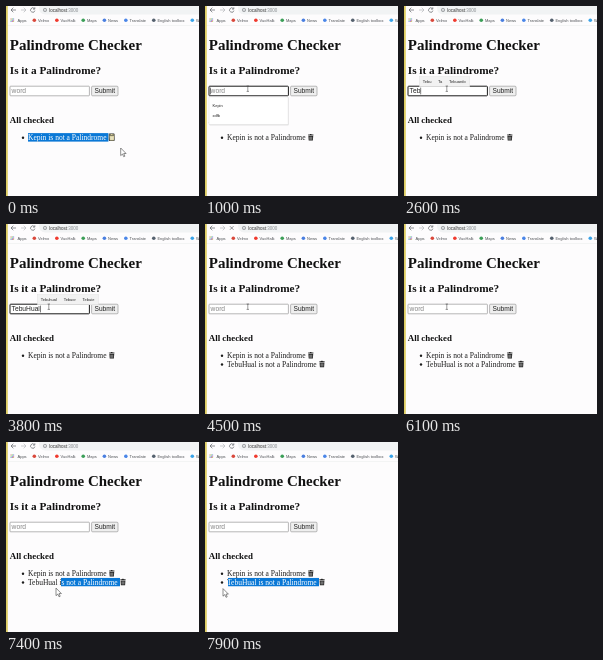
Write an HTML page that moves like this. It is 193x190 px and loops after 8 s.

```html
<!DOCTYPE html>
<html lang="en">
<head>
<meta charset="utf-8">
<title>Palindrome Checker</title>
<style>
  html, body { margin: 0; width: 100%; height: 100%; overflow: hidden; background: #fdfcfd; }
  svg { display: block; width: 100%; height: 100%; }
  text { white-space: pre; }
  .serif { font-family: "Liberation Serif", "Times New Roman", serif; }
  .sans { font-family: "Liberation Sans", Arial, sans-serif; }
  .bold { font-weight: 700; }
</style>
</head>
<body>
<svg viewBox="0 0 193 190">
  <!-- browser bar -->
  <rect x="33" y="-4" width="170" height="12.4" rx="6" fill="#f1f3f4"/>
  <g fill="none" stroke="#5f6368" stroke-width=".7">
    <path d="M10 4H5M7.3 1.7L5 4l2.3 2.3"/>
    <path d="M15 4h5M17.7 1.7L20 4l-2.3 2.3" stroke="#b5b8bb"/>
    <path id="reload" d="M28.4 2.6A2.2 2.2 0 1 0 28.9 4.6M28.8 1.3V3.1H27"/>
    <path id="stop" d="M24.9 2.2l3.6 3.6M28.5 2.2l-3.6 3.6"/>
    <circle cx="39" cy="4" r="1.7" stroke-width=".5"/>
    <path d="M39 3.8v1.1M39 2.9v.4" stroke-width=".5"/>
  </g>
  <text class="sans" x="43.3" y="5.7" font-size="4.5" fill="#333">localhost<tspan fill="#85898d">:3000</tspan></text>
  <g id="marks" class="sans" font-size="4" fill="#4a4d51"></g>
  <rect y="19" width="193" height=".5" fill="#e9eaeb"/>
  <rect width="1.8" height="190" fill="#decd62"/>

  <!-- page -->
  <g class="serif bold" fill="#111">
    <text x="3.8" y="44" font-size="14.95">Palindrome Checker</text>
    <text x="3.8" y="68.4" font-size="11.25">Is it a Palindrome?</text>
    <text x="3.8" y="116.8" font-size="8.9">All checked</text>
  </g>
  <rect id="field" x="4" y="80.2" width="79.4" height="9.6" rx=".7" fill="#fff"/>
  <text id="value" class="sans" x="5.6" y="87.4" font-size="6.7"></text>
  <rect id="caret" y="81.6" width=".5" height="6.8"/>
  <rect x="85.6" y="80.2" width="26.4" height="9.6" rx="1" fill="#efefef" stroke="#8c8c8c" stroke-width=".6"/>
  <text class="sans" x="98.8" y="87.4" font-size="6.6" text-anchor="middle" fill="#222">Submit</text>
  <g id="list" class="serif" font-size="7.52" fill="#1c1c1c"></g>

  <!-- history list -->
  <g id="history" class="sans" font-size="4" fill="#222">
    <rect x="4.2" y="91.4" width="79.6" height="28" rx="1" fill="#000" opacity=".1"/>
    <rect x="4" y="90.8" width="79.2" height="27.8" rx=".8" fill="#fff" stroke="#d5d5d5" stroke-width=".4"/>
    <text x="7.5" y="100.6">Kepin</text>
    <text x="7.5" y="111.4">xdfb</text>
  </g>

  <!-- word hints -->
  <g id="hints" class="sans" font-size="4" fill="#222">
    <rect y="70.6" height="10.2" fill="#f2f2f2" stroke="#dcdcdc" stroke-width=".4"/>
    <text y="77.1"></text>
  </g>

  <path id="arrow" d="M0 0V7.6L1.8 6 3 8.7 4.2 8.2 3 5.5H5.4Z" fill="#fff" stroke="#333" stroke-width=".55"/>
  <path id="beam" d="M-1.2 -2.7H1.2M0 -2.7V2.7M-1.2 2.7H1.2" fill="none" stroke="#444" stroke-width=".55"/>
</svg>

<script>
const LOOP = 8000, STEP = 100;
const $ = id => document.getElementById(id);
const clamp = (v, lo, hi) => Math.min(hi, Math.max(lo, v));
const set = (el, attrs) => { for (const k in attrs) el.setAttribute(k, attrs[k]); };
const show = (el, on) => set(el, { visibility: on ? "visible" : "hidden" });

function make(parent, tag, attrs, text) {
  const el = document.createElementNS("http://www.w3.org/2000/svg", tag);
  set(el, attrs);
  if (text) el.textContent = text;
  parent.append(el);
  return el;
}

// Bookmarks flow from left to right
const marks = {
  Apps: "none", Velmo: "#d9483b", VuoHalk: "#f03a2e", Maps: "#3c9f58",
  News: "#4a7fe0", Translate: "#4a86e8", "English toolbox": "#55616e", Wi: "#3aa3e8"
};
let left = 11.5;
for (const [label, fill] of Object.entries(marks)) {
  const text = make($("marks"), "text", { x: left, y: 15.7 }, label);
  make($("marks"), "circle", { cx: left - 3.7, cy: 14.3, r: 1.8, fill });
  left += text.getComputedTextLength() + 11.4;
}
for (let i = 0; i < 9; i++) {
  const col = i % 3, line = (i - col) / 3;
  make($("marks"), "rect", {
    x: 4.6 + col * 1.3, y: 12.5 + line * 1.3, width: .9, height: .9,
    fill: `hsl(${(col + line) * 110} 60% 55%)`
  });
}

// One result row with a selectable line and a bin button
function row(name, y, binX) {
  const g = make($("list"), "g", {});
  const line = name + " is not a Palindrome";
  const box = { y: y - 6.9, height: 8.7 };
  make(g, "circle", { cx: 17, cy: y - 2.2, r: 1.2 });
  make(g, "text", { x: 22, y }, line);
  const clip = make(make(g, "clipPath", { id: "sel" + y }), "rect", box);
  const marked = make(g, "g", { "clip-path": `url(#sel${y})` });
  make(marked, "rect", { ...box, width: 193, fill: "#0a78d6" });
  make(marked, "text", { x: 22, y, fill: "#fff" }, line);
  const back = make(g, "rect", { x: binX - .4, y: y - 6.4, width: 5.8, height: 7.4, rx: .8, fill: "#25282a" });
  const bin = make(g, "g", { transform: `translate(${binX} ${y - 6})` });
  make(bin, "path", { d: "M0 .6H1.5L2 0H3L3.5 .6H5.2V1.6H0ZM.2 2H5L4.7 6.6H.5Z" });
  make(bin, "path", { d: "M1.6 2.7V5.8M2.6 2.7V5.8M3.6 2.7V5.8", stroke: "#fff", "stroke-width": .4 });
  return {
    g,
    select(from, to, withBin) {
      set(clip, { x: from, width: to - from });
      show(back, withBin);
      set(bin, { fill: withBin ? "#d9cf9c" : "#222" });
    }
  };
}
const first = row("Kepin", 134, 103.2);
const second = row("TebuHual", 142.7, 114.4);

// Typing: one key every 250 ms
const word = "TebuHual", TYPE = 2000, KEY = 250;
const early = ["Tebu", "Ta", "Tebuardo"], late = ["Tebuhual", "Tebuor", "Tebuie"];

// Pointer moves: start, end, x, y
const moves = [
  [0, 900, 42.8, 82.7],
  [6100, 6300, 179, 105],
  [6500, 6800, 155, 157],
  [6800, 7100, 116, 145],
  [7100, 7800, 18, 146.6]
];
function pointer(t) {
  let x = 114.7, y = 142;
  for (const [start, end, toX, toY] of moves) {
    const p = clamp((t - start) / (end - start), 0, 1);
    const eased = p * (2 - p);
    x += (toX - x) * eased;
    y += (toY - y) * eased;
  }
  return [x, y];
}

function drawHints(count, on) {
  show($("hints"), on);
  if (!on) return;
  const [box, label] = $("hints").children;
  const x = 5.8 + 3.2 * count;
  label.textContent = "";
  set(label, { x: x + 3.3 });
  (count < 4 ? early : late).forEach((w, i) => make(label, "tspan", { dx: i ? 6.7 : 0 }, w));
  const end = label.getBBox();
  set(box, { x, width: end.x + end.width + 3.3 - x });
}

function draw(t) {
  const focus = t >= 1000 && t < 4400;
  const count = t < 4400 ? clamp(Math.floor((t - TYPE) / KEY) + 1, 0, word.length) : 0;
  const typing = t >= TYPE && t < 4000;
  const value = $("value");
  value.textContent = word.slice(0, count) || "word";
  set(value, { fill: count ? "#222" : "#858585" });
  set($("field"), { stroke: focus ? "#1a1a1a" : "#858585", "stroke-width": focus ? 1 : .6 });
  set($("caret"), { x: count ? 5.8 + value.getComputedTextLength() : 5.4 });
  show($("caret"), typing || focus && t < 1600);
  show($("history"), focus && t < TYPE);
  drawHints(count, typing && t > TYPE + STEP);

  const loading = t >= 4300 && t < 4600;
  show($("reload"), !loading);
  show($("stop"), loading);

  const [x, y] = pointer(t);
  const fresh = t < 300;
  first.select(22, fresh ? 102.4 : 22, fresh);
  second.g.style.display = t >= 4400 ? "" : "none";
  second.select(t > 7100 ? clamp(x + 5, 22, 114) : 114, 114, false);

  const beam = t >= 900 && t <= 6100;
  for (const id of ["arrow", "beam"]) {
    set($(id), { transform: `translate(${x} ${y})` });
    show($(id), beam === (id === "beam"));
  }
}

function tick() {
  const t = performance.now() % LOOP;
  draw(Math.floor(t / STEP) * STEP);
  requestAnimationFrame(tick);
}
tick();
</script>
</body>
</html>
```
